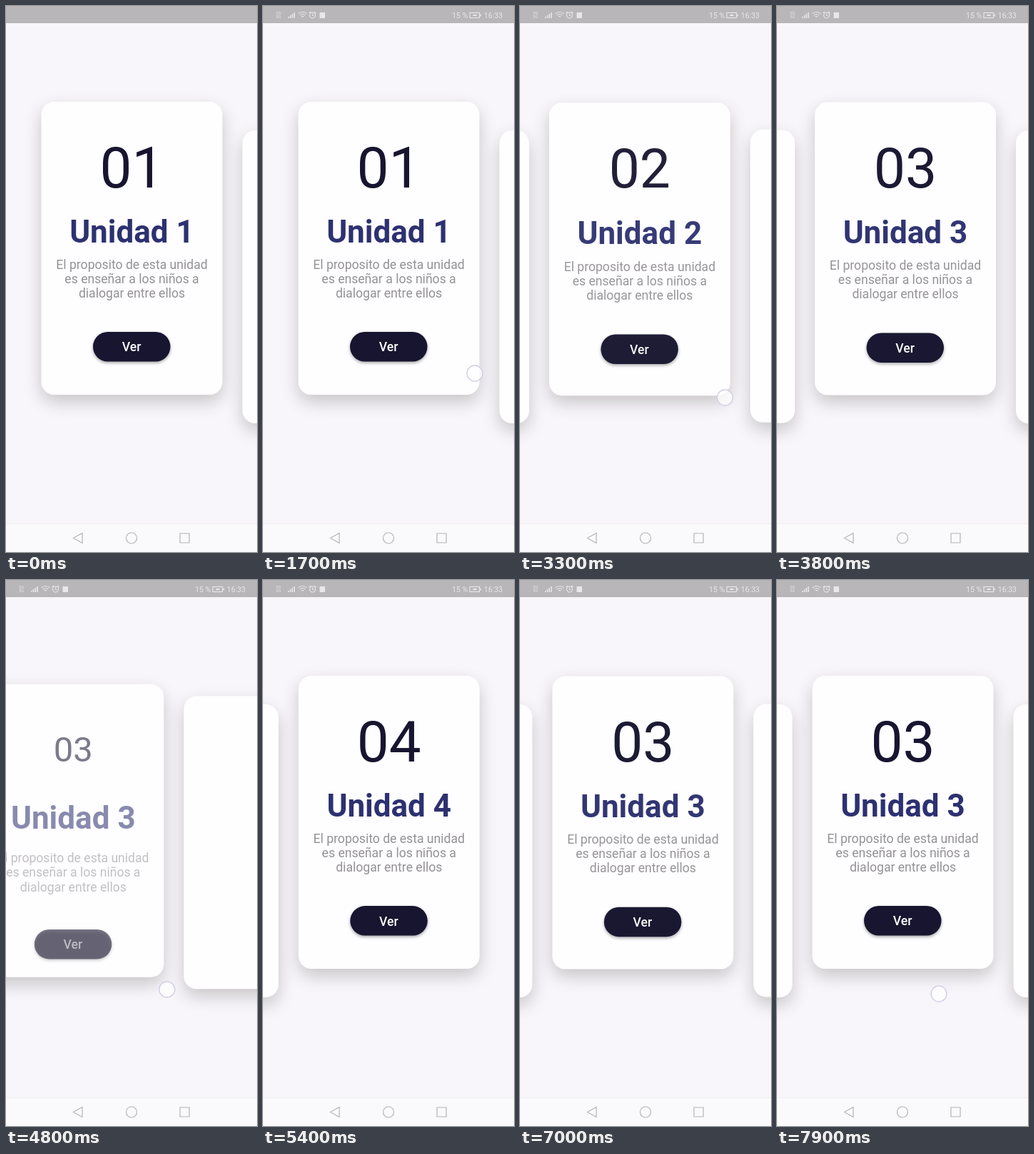
An HTML page with a canvas that plays this animation: 352 by 764 pixels, repeating every 8 s.

```html
<!DOCTYPE html>
<html lang="es">
<head>
<meta charset="utf-8">
<title>Unidades</title>
<style>
  html, body { margin: 0; width: 100%; height: 100%; overflow: hidden; background: #f8f6fa; }
  canvas { display: block; width: 352px; height: 764px; }
</style>
</head>
<body>
<canvas id="stage" width="352" height="764"></canvas>
<script>
const ctx = document.getElementById('stage').getContext('2d');
const W = 352, H = 764, LOOP = 8000, STEP = 100;
const CARD = { x: 49.5, y: 134, w: 254, h: 410, r: 18, pitch: 282, drop: 40, count: 4 };
const BODY = ['El proposito de esta unidad', 'es enseñar a los niños a', 'dialogar entre ellos'];
const INK = '#17152f';

// Each swipe: start time, page it leaves, direction, finger position.
const SWIPES = [
  { start: 1700, page: 0, dir: 1, x: 297, y: 514 },
  { start: 3141, page: 1, dir: 1, x: 305, y: 548 },
  { start: 4518, page: 2, dir: 1, x: 317, y: 573 },
  { start: 6356, page: 3, dir: -1, x: 204, y: 580 },
  { start: 7900, page: 2, dir: -1, x: 227, y: 579 }
];
const HOLD = 100, RELEASE = 350, REACH = 0.55, SETTLE = 86, SLOP = 9;

function swipeProgress(u) {
  if (u < HOLD) return 0;
  if (u < RELEASE) return REACH * ((u - HOLD) / (RELEASE - HOLD)) ** 2;
  return 1 - (1 - REACH) * Math.exp((RELEASE - u) / SETTLE);
}

function roundRect(x, y, w, h, r) {
  ctx.beginPath();
  ctx.roundRect(x, y, w, h, r);
}

function shadow(color, blur, dy) {
  ctx.shadowColor = color;
  ctx.shadowBlur = blur;
  ctx.shadowOffsetY = dy;
}

function text(str, x, y, size, weight, color, align = 'center') {
  ctx.font = `${weight} ${size}px Roboto, sans-serif`;
  ctx.textAlign = align;
  ctx.fillStyle = color;
  ctx.fillText(str, x, y);
}

function drawContent(index, cx, top, d) {
  const alpha = 1 - 1.5 * d;
  if (alpha <= 0) return;
  ctx.save();
  ctx.globalAlpha = alpha;

  const size = 80 * (1 - 1.33 * d);
  text('0' + (index + 1), cx, top + 91.3 + 0.3555 * size, size, 400, INK);
  text('Unidad ' + (index + 1), cx, top + 197 + 20 * d, 44, 700, '#2d3170');
  BODY.forEach((line, i) =>
    text(line, cx, top + 233.7 + 20.2 * i + 54 * d, 17.6, 400, '#939196'));

  const by = top + 322 + 73 * d;
  ctx.save();
  shadow('rgba(0,0,0,.35)', 4, 2);
  ctx.fillStyle = INK;
  roundRect(cx - 54.5, by, 108.5, 41.5, 20.7);
  ctx.fill();
  ctx.restore();
  text('Ver', cx - 0.5, by + 27.4, 17.6, 500, '#fff');
  ctx.restore();
}

function drawCard(index, page) {
  const offset = index - page, d = Math.min(1, Math.abs(offset));
  const x = CARD.x + offset * CARD.pitch, y = CARD.y + d * CARD.drop;
  if (x > W + 40 || x + CARD.w < -40) return;
  ctx.save();
  shadow('rgba(0,0,0,.2)', 24, 10);
  ctx.fillStyle = '#fefdff';
  roundRect(x, y, CARD.w, CARD.h, CARD.r);
  ctx.fill();
  ctx.restore();
  drawContent(index, x + CARD.w / 2, y, d);
}

function drawTouch(x, y) {
  ctx.beginPath();
  ctx.arc(x, y, 11, 0, 7);
  ctx.fillStyle = 'rgba(255,255,255,.75)';
  ctx.fill();
  ctx.strokeStyle = '#d3cfe6';
  ctx.lineWidth = 1.4;
  ctx.stroke();
}

function drawStatus(alpha) {
  ctx.fillStyle = '#b9b6b9';
  ctx.fillRect(0, 0, W, 24);
  ctx.save();
  ctx.globalAlpha = alpha;
  const tint = '#e9e7e9';
  ctx.strokeStyle = tint;
  ctx.lineWidth = 1.1;

  text('2G', 18, 12, 6, 400, tint, 'left');
  text('3G', 18, 17, 6, 400, tint, 'left');
  for (let i = 0; i < 4; i++) ctx.fillRect(35 + i * 2.7, 15 - i * 2, 1.6, 2 + i * 2);

  for (const r of [2.5, 5.5, 8.5]) {
    ctx.beginPath();
    ctx.arc(55.5, 17, r, -2.35, -0.79);
    ctx.stroke();
  }

  ctx.beginPath();
  ctx.arc(69.5, 13, 4, 0, 7);
  ctx.moveTo(69.5, 10.5);
  ctx.lineTo(69.5, 13.2);
  ctx.lineTo(71.5, 14);
  ctx.moveTo(64.5, 10);
  ctx.lineTo(67, 8);
  ctx.moveTo(74.5, 10);
  ctx.lineTo(72, 8);
  ctx.stroke();

  ctx.fillRect(79.5, 9, 7.5, 8);
  text('15 %', 265, 17, 10.5, 400, tint, 'left');
  ctx.strokeRect(290, 9.5, 13.5, 7);
  ctx.fillRect(304.5, 11.5, 1.5, 3);
  ctx.fillRect(294.5, 12, 5, 2);
  text('16:33', 336, 17, 10.5, 400, tint, 'right');
  ctx.restore();
}

function drawNav() {
  ctx.fillStyle = '#faf9fb';
  ctx.fillRect(0, 724, W, H - 724);
  ctx.fillStyle = '#efedf0';
  ctx.fillRect(0, 724, W, 1);
  ctx.strokeStyle = '#b5b3b6';
  ctx.lineWidth = 1.2;
  ctx.beginPath();
  ctx.moveTo(107, 737.5);
  ctx.lineTo(107, 751.5);
  ctx.lineTo(94.5, 744.5);
  ctx.closePath();
  ctx.moveTo(183.5, 744.5);
  ctx.arc(176, 744.5, 7.5, 0, 7);
  ctx.rect(244, 738, 13, 13);
  ctx.stroke();
}

function draw(t) {
  const swipe = SWIPES.filter(s => s.start <= t).pop();
  const u = swipe ? t - swipe.start : 0;
  const progress = swipe ? swipeProgress(u) : 0;
  const page = swipe ? swipe.page + swipe.dir * progress : 0;

  ctx.fillStyle = '#f8f6fa';
  ctx.fillRect(0, 0, W, H);
  for (let i = 0; i < CARD.count; i++) drawCard(i, page);

  if (swipe && u < RELEASE) {
    const slop = SLOP * Math.min(1, u / HOLD);
    drawTouch(swipe.x - swipe.dir * (progress * CARD.pitch + slop), swipe.y);
  }
  drawStatus(Math.min(1, t / 200));
  drawNav();
}

const origin = performance.now();
function tick() {
  const t = (performance.now() - origin) % LOOP;
  draw(Math.floor(t / STEP) * STEP);
  requestAnimationFrame(tick);
}
tick();
</script>
</body>
</html>
```
